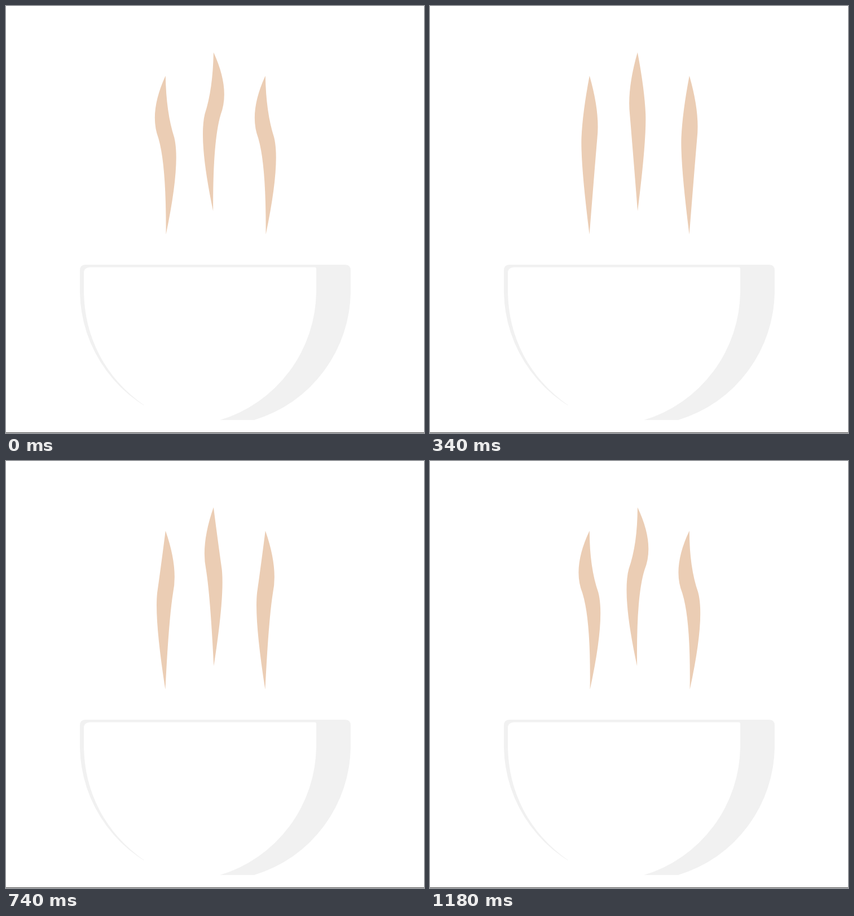
An HTML page without scripts for the animation above (1200 ms loop, 741x756 px).

```html
<!DOCTYPE html>
<html lang="en">
<head>
<meta charset="utf-8">
<title>Steaming bowl</title>
<style>
  html, body { margin: 0; width: 100%; height: 100%; overflow: hidden; background: #fff; }
  svg { display: block; width: 741px; height: 756px; }
  .steam { fill: #ebcdb4; }
  .bowl { fill: #f1f1f1; }
  .inside { fill: #fff; }
  .floor { fill: #444; }
</style>
</head>
<body>
<svg viewBox="0 0 741 756">
  <defs>
    <!-- One wisp, swaying linearly between a pose and its mirror image -->
    <path id="wisp" d="M0 0Q-31 65 -12.5 110.5Q2.5 158 .8 281Q28 156 15.5 109Q0 65 0 0Z">
      <animate attributeName="d" dur="1.2s" begin="-.02s" repeatCount="indefinite"
        values="M0 0Q-31 65 -12.5 110.5Q2.5 158 .8 281Q28 156 15.5 109Q0 65 0 0Z;
                M0 0Q0 65 -15.5 109Q-28 156 -.8 281Q-2.5 158 12.5 110.5Q31 65 0 0Z;
                M0 0Q-31 65 -12.5 110.5Q2.5 158 .8 281Q28 156 15.5 109Q0 65 0 0Z"/>
    </path>
  </defs>

  <g class="steam">
    <use href="#wisp" x="282.8" y="123.5"/>
    <use href="#wisp" transform="translate(367.9 82) scale(-1 1)"/>
    <use href="#wisp" x="459.8" y="123.5"/>
  </g>

  <path class="bowl" d="M131 503V468Q131 458 141 458H601Q611 458 611 468V503A240 240 0 0 1 440 733H302A240 240 0 0 1 131 503Z"/>
  <path class="inside" d="M138 503V473Q138 462.5 150 462.5H548Q550 462.5 550 465V503A240 240 0 0 1 378 733.5H302L245 707C174 657 138 583 138 503Z"/>
  <path class="inside" d="M245 707L302 690V734A240 240 0 0 1 243 707Z"/>
  <rect class="floor" y="755" width="741" height="1"/>
</svg>
</body>
</html>
```
